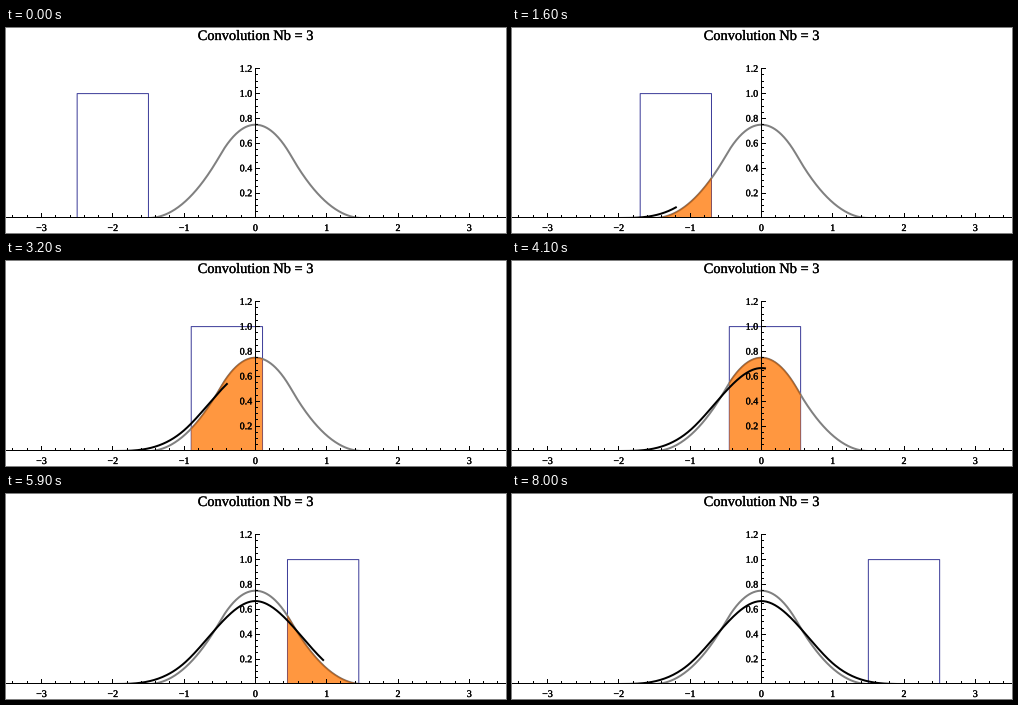
A matplotlib script that plays this animation: 500 by 205 pixels, repeating every 8.1 s.

```python
import numpy as np
import matplotlib.pyplot as plt
from matplotlib.animation import FuncAnimation
from matplotlib.patches import Rectangle
from matplotlib.patheffects import withStroke

WIDTH, HEIGHT, DPI = 500, 205, 64
FRAMES, INTERVAL = 81, 100
X0, Y0, SX, SY = 249.4, 190, 71.3, 124.4
PT = 72 / DPI  # points per pixel
FONT = "Liberation Serif"

plt.rcParams["text.hinting"] = "none"


def px(x):
    return X0 + SX * np.asarray(x, float)


def py(y):
    return Y0 - SY * np.asarray(y, float)


def pixel_center(v):
    return np.floor(v) + 0.5


def quadratic_spline(x):
    a = np.abs(x)
    return np.where(a < 0.5, 0.75 - a**2, 0.5 * np.clip(1.5 - a, 0, None) ** 2)


def cubic_spline(x):
    a = np.abs(x)
    return np.where(a < 1, 2 / 3 - a**2 + a**3 / 2, np.clip(2 - a, 0, None) ** 3 / 6)


fig = plt.figure(figsize=(WIDTH / DPI, HEIGHT / DPI), dpi=DPI, facecolor="white")
ax = fig.add_axes([0, 0, 1, 1])
ax.set(xlim=(0, WIDTH), ylim=(HEIGHT, 0))
ax.axis("off")
plot_area = Rectangle((0, 0), WIDTH, Y0, transform=ax.transData)


def line(xs=(), ys=(), color="black", width=1.0, z=1, **kw):
    kw = {"solid_capstyle": "butt", "snap": False, **kw}
    return ax.plot(xs, ys, color=color, lw=width * PT, zorder=z, **kw)[0]


def curve(xs=(), ys=(), **kw):
    artist = line(xs, ys, **kw)
    artist.set_clip_path(plot_area)
    return artist


def label(x, y, text, size, ha="center"):
    ax.text(x, y, text, fontname=FONT, fontsize=size * PT, ha=ha,
            va="baseline", zorder=7,
            path_effects=[withStroke(linewidth=0.3 * PT, foreground="black")])


def draw_axes():
    base, axis_x = Y0 - 0.5, pixel_center(X0)
    line([0, WIDTH], [base, base], z=6)
    line([axis_x, axis_x], [40, Y0], z=6)
    for i in range(-17, 18):
        x = pixel_center(px(i / 5))
        line([x, x], [Y0, Y0 - (5 if i % 5 == 0 else 3)], z=6)
        if i % 5 == 0:
            label(px(i / 5), 203, str(i // 5).replace("-", "\u2212"), 10)
    for i in range(1, 25):
        y = pixel_center(py(i / 20))
        line([axis_x, axis_x + (4.5 if i % 4 == 0 else 2.5)], [y, y], z=6)
        if i % 4 == 0:
            label(246.2, py(i / 20) + 3.1, f"{i / 20:.1f}", 10, "right")


label(249.5, 12, "Convolution Nb = 3", 14.4)
draw_axes()

xs = np.linspace(-1.5, 1.5, 301)
curve(px(xs), py(quadratic_spline(xs)), color="#808080", width=2, z=2)
box = curve(color="#3d3d99", z=1, solid_joinstyle="round")
overlap = ax.fill([0], [0], color=(1, 0.46, 0, 0.75), lw=0, zorder=3)[0]
edge = curve(color="#a8602a", z=4)
result = curve(width=2, z=5, solid_capstyle="projecting")


def update(i):
    center = -2 + 4 * i / (FRAMES - 1)
    left, right = center - 0.5, center + 0.5
    box.set_data(px([left, left, right, right]), py([0, 1, 1, 0]))

    lo, hi = max(left, -1.5), min(right, 1.5)
    shared = np.linspace(lo, max(lo, hi), 120)
    top = quadratic_spline(shared)
    overlap.set_xy(np.column_stack([px(np.r_[lo, shared, shared[-1]]),
                                    py(np.r_[0, top, 0])]))
    edge.set_data(px(shared), py(top))
    visible = hi - lo > 1e-6
    overlap.set_visible(visible)
    edge.set_visible(visible)

    done = np.linspace(-2, center, 200)
    result.set_data(px(done), py(cubic_spline(done)))
    result.set_visible(i > 0)
    return box, overlap, edge, result


anim = FuncAnimation(fig, update, frames=FRAMES, interval=INTERVAL,
                     repeat=True, repeat_delay=0, blit=False)
plt.show()
```
